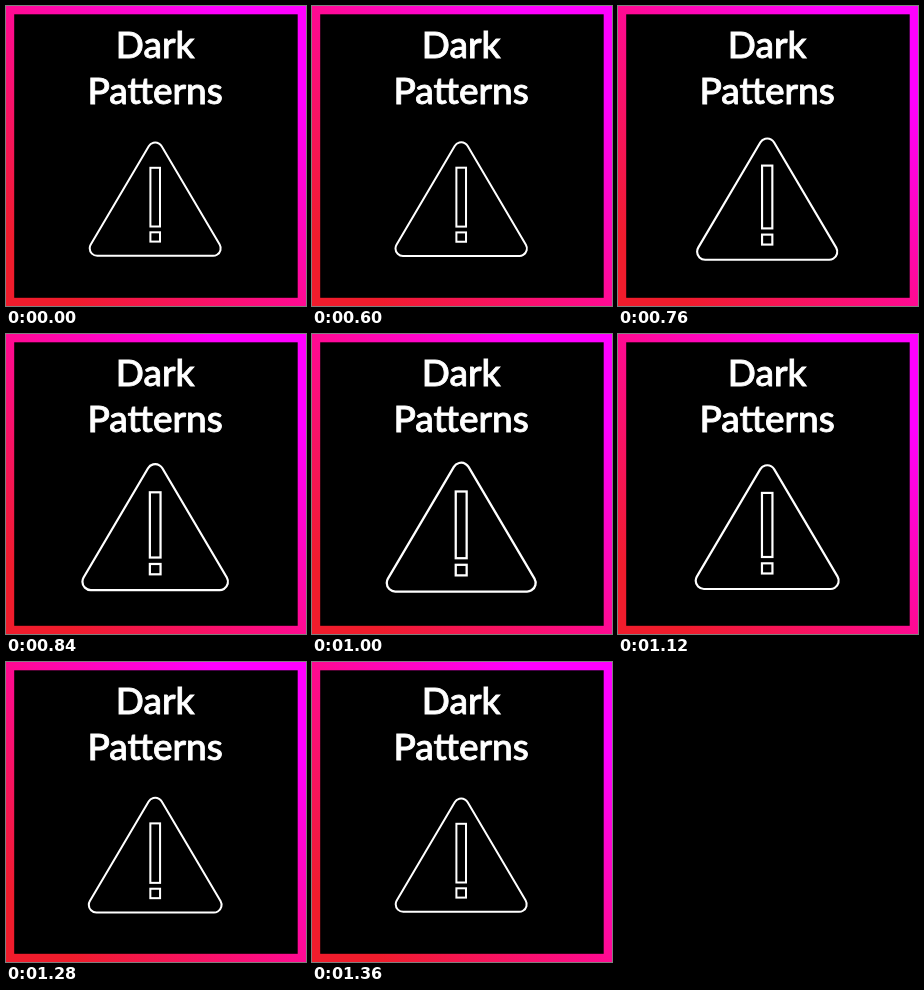
Animation of 300x300 px, one loop 1920 ms. Source, as an HTML page with a canvas:

```html
<!DOCTYPE html>
<html lang="en">
<head>
<meta charset="utf-8">
<title>Dark Patterns</title>
<style>
  html, body { margin: 0; width: 100%; height: 100%; overflow: hidden; background: #000; }
  canvas { display: block; width: 300px; height: 300px; }
</style>
</head>
<body>
<canvas id="stage" width="300" height="300"></canvas>
<script>
const ctx = document.getElementById('stage').getContext('2d');
const LOOP = 1920, STEP = 40;
const PULSE_START = 560, PULSE_LENGTH = 800, GROWTH = 0.14;
const CENTER = { x: 149.2, y: 193.3 };

function makeBorderPaint() {
  const paint = ctx.createLinearGradient(0, 300, 300, 0);
  paint.addColorStop(0.12, '#f01c2c');
  paint.addColorStop(0.5, '#ff0a92');
  paint.addColorStop(0.84, '#ff00ff');
  return paint;
}
const borderPaint = makeBorderPaint();

function drawBackground() {
  ctx.fillStyle = borderPaint;
  ctx.fillRect(0, 0, 300, 300);
  ctx.fillStyle = '#000';
  ctx.fillRect(8.2, 8.3, 283.5, 283.5);
}

function drawTitle() {
  ctx.font = '500 37px Lato, sans-serif';
  ctx.textAlign = 'center';
  ctx.fillStyle = ctx.strokeStyle = '#fff';
  ctx.lineWidth = 0.9;
  for (const [word, baseline] of [['Dark', 52], ['Patterns', 98]]) {
    ctx.fillText(word, CENTER.x, baseline);
    ctx.strokeText(word, CENTER.x, baseline);
  }
}

// Rounded triangle built from three corner arcs around the center.
function traceTriangle() {
  const halfWidth = 58, top = -49.3, bottom = 49, radius = 7.5;
  const tilt = Math.atan2(halfWidth, bottom - top);
  ctx.beginPath();
  ctx.arc(0, top, radius, Math.PI + tilt, -tilt);
  ctx.arc(halfWidth, bottom, radius, -tilt, Math.PI / 2);
  ctx.arc(-halfWidth, bottom, radius, Math.PI / 2, Math.PI + tilt);
  ctx.closePath();
}

function drawWarning(scale) {
  ctx.save();
  ctx.translate(CENTER.x, CENTER.y);
  ctx.scale(scale, scale);
  ctx.strokeStyle = '#fff';
  ctx.lineWidth = 2;
  traceTriangle();
  ctx.stroke();
  ctx.strokeRect(-4.8, -31.5, 9.6, 58.7);
  ctx.strokeRect(-4.8, 33, 9.6, 9.3);
  ctx.restore();
}

function pulseScale(time) {
  const phase = (time - PULSE_START) / PULSE_LENGTH;
  if (phase <= 0 || phase >= 1) return 1;
  return 1 + GROWTH * (1 - Math.cos(2 * Math.PI * phase)) / 2;
}

const start = performance.now();
function render() {
  const elapsed = (performance.now() - start) % LOOP;
  const time = Math.floor(elapsed / STEP) * STEP;
  drawBackground();
  drawTitle();
  drawWarning(pulseScale(time));
  requestAnimationFrame(render);
}
render();
</script>
</body>
</html>
```
